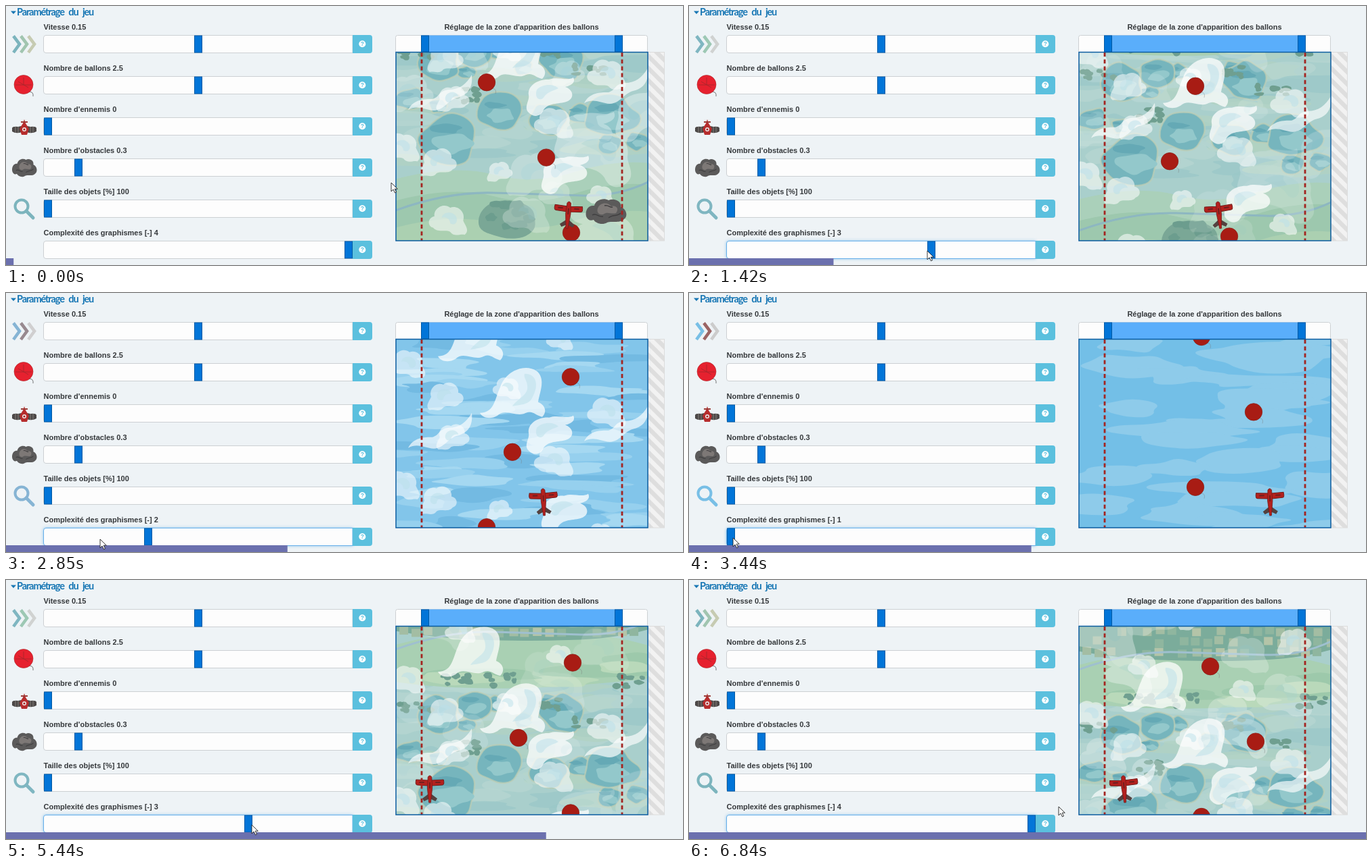
These frames come from a looping animation (1000 by 384 pixels, 6920 ms). An HTML page:

```html
<!DOCTYPE html>
<html lang="fr">
<head>
<meta charset="utf-8">
<title>Paramétrage du jeu</title>
<style>
  html, body { margin: 0; width: 100%; height: 100%; overflow: hidden; background: #eef3f6; }
  svg { display: block; }
  .label { font: bold 11px "Liberation Sans", Arial, sans-serif; fill: #35383b; }
  .title { font: bold 14.5px Lato, "Noto Sans", sans-serif; letter-spacing: -1.1px; word-spacing: 4px; fill: #1676b4; }
  .help { font: bold 8.5px "Liberation Sans", Arial, sans-serif; fill: #5bc0de; text-anchor: middle; }
  .box { fill: #fdfdfd; stroke: #ccd0d3; }
  .focus { stroke: #66afe9; filter: drop-shadow(0 0 2px #66afe9aa); }
  .knob { fill: #0275d8; stroke: #025aa5; }
</style>
</head>
<body>
<svg id="stage" width="1000" height="384" viewBox="0 0 1000 384">
  <defs>
    <clipPath id="view"><rect x="576" y="69" width="372" height="279"/></clipPath>
    <pattern id="stripes" width="18" height="18" patternUnits="userSpaceOnUse" patternTransform="translate(948 69)">
      <rect width="18" height="18" fill="#f2f2f2"/>
      <path d="M0 0L18 18H9L0 9ZM9 0H18V9Z" fill="#dedede"/>
    </pattern>
    <g id="ghost">
      <path fill="#fff" fill-opacity=".74" d="M-52 30C-30 30-30 8-22-8C-14-32 14-44 32-32C46-20 36 0 34 14C44 18 48 28 40 36C30 34 26 26 16 30C2 38-14 22-26 34C-36 40-48 38-52 30Z"/>
      <path fill="#b9dfe9" fill-opacity=".5" d="M14-28C34-28 34-8 26 6C22 18 8 18-4 20C4 8 20 4 18-10C18-18 12-22 14-28Z"/>
    </g>
    <g id="wing">
      <path fill="#fff" fill-opacity=".74" d="M38-26C42-18 34-14 26-12C38-8 40 4 30 9C20 14 2 10-6 22C-10 32-20 34-28 26C-36 18-26 8-28 0C-30-14-14-24 2-23C16-28 28-20 38-26Z"/>
      <path fill="#b9dfe9" fill-opacity=".5" d="M-16-8C-6-18 10-16 16-10C8-6-2-4-6 4C-12 10-20 4-16-8Z"/>
    </g>
    <path id="swirl" fill="#fff" fill-opacity=".66" d="M36-34C38-14 30-4 14 0C0 4-4 18-20 19C-34 18-44 10-58 18C-50 2-34 2-22 2C-10-2-14-10 2-12C18-12 28-20 36-34Z"/>
    <g id="puff">
      <path fill="#fff" fill-opacity=".55" d="M-24 20C-32 14-24 6-22 0C-26-12-14-22-4-18C6-26 20-16 18-6C28-4 28 8 20 10C14 18 2 12-4 16C-10 24-18 18-24 20Z"/>
      <path fill="#b9dfe9" fill-opacity=".5" d="M-12-6C-6-14 6-12 8-4C2-6-4-2-4 4C-10 8-16 2-12-6Z"/>
    </g>
    <g id="rock">
      <path fill="#5b5a5a" d="M-29 8C-31-1-26-9-17-8C-15-17-3-20 4-16C13-20 24-14 22-6C31-3 33 8 27 12C20 19 8 14 2 17C-6 22-16 17-18 13C-23 15-27 13-29 8Z"/>
      <path fill="#7d7876" d="M-12-4C-8-14 4-13 8-7C16-9 20-3 15 3C8 5 2 0-4 5C-10 6-14 2-12-4Z"/>
      <path fill="none" stroke="#403f40" stroke-width="1.5" d="M-20 6C-14 2-10 10-4 8M4 10C10 5 18 8 22 3M-2-8C4-10 6-4 10-6"/>
    </g>
    <g id="ball">
      <path d="M9 9Q15 10 13 17" fill="none" stroke="#777" stroke-width=".8" opacity=".5"/>
      <circle r="12.700" fill="#a81c14" stroke="#8d2019" stroke-width=".8"/>
    </g>
  </defs>
  <rect width="1000" height="384" fill="#eef3f6"/>
  <path d="M7 7.500H15L11 12Z" fill="#1676b4"/>
  <text class="title" x="16" y="14">Paramétrage du jeu</text>
  <g id="rows"></g>

  <g fill="none" stroke-width="4.600" id="chevrons"></g>
  <path d="M34 127Q41 127 40 134" fill="none" stroke="#777"/>
  <circle cx="26" cy="116.500" r="14" fill="#e6212f" stroke="#a92a2c" stroke-width=".6"/>
  <path d="M14 117H38M26 106V117M18 112L33 121" stroke="#8f2a2c" stroke-width=".9" opacity=".7"/>
  <g>
    <path d="M9 181Q10 178 18 179L27 177L36 179Q44 178 45 181V186Q38 190 31 187H23Q15 190 9 186Z" fill="#4c4847"/>
    <path d="M14 179V188M18 179V188M36 179V188M40 179V188" stroke="#85807d"/>
    <path d="M27 168L29 174L34 182L31 191H23L20 182L25 174Z" fill="#b62d2d"/>
    <path d="M22 172H32" stroke="#9d3b37" stroke-width="2"/>
    <circle cx="27" cy="183" r="3" fill="#eee"/><circle cx="27" cy="183" r="1.600" fill="#a22"/>
  </g>
  <use href="#rock" transform="translate(27 239.500) scale(.61 .72)"/>
  <g id="lens" fill="none">
    <circle cx="23" cy="297" r="9.500" stroke-width="4"/>
    <path d="M30 304L40 314" stroke-width="5" stroke-linecap="round"/>
  </g>

  <text class="label" x="761.500" y="35" text-anchor="middle">Réglage de la zone d'apparition des ballons</text>
  <rect class="box" x="575.500" y="43.500" width="372" height="26" rx="3"/>
  <rect x="613" y="43.500" width="298" height="25" fill="#5aaefb"/>
  <rect class="knob" x="613.500" y="44" width="11" height="24"/>
  <rect class="knob" x="899.500" y="44" width="11" height="24"/>
  <rect x="948" y="68.500" width="24.500" height="279.500" fill="url(#stripes)" stroke="#dcdcdc"/>

  <g clip-path="url(#view)">
    <g id="calm"></g>
    <g id="sea"></g>
    <g id="land"></g>
    <g id="clouds"></g>
    <g id="haze"></g>
    <g id="things"></g>
    <g id="plane">
      <path d="M-2 17L-12 24L-9 28L0 24L9 28L12 24L2 17Z" fill="#54413f"/>
      <path d="M-22-4Q-24 4-20 4L-3 5H3L20 4Q24 4 22-4L3-3H-3Z" fill="#b3201d" stroke="#711d1b"/>
      <path d="M-3-8Q0-12 3-8L4 8L1.500 30H-1.500L-4 8Z" fill="#b3201d" stroke="#711d1b" stroke-width=".8"/>
      <path d="M-17 0H-9M9 0H17M0 0V9" stroke="#6d1f1e" stroke-width="2"/>
    </g>
    <path d="M614 69V348M910 69V348" stroke="#a32420" stroke-width="2.800" stroke-dasharray="6 4.200"/>
  </g>
  <rect x="576" y="68.500" width="372" height="279.500" fill="none" stroke="#0b5ca0" stroke-width="1.500"/>

  <rect id="bar" y="374" height="10" fill="#6b70ae"/>
  <path id="cursor" d="M0 0V13L3 10L5.500 15L7.500 14L5.200 9.200H9.300Z" fill="#fff" stroke="#222" stroke-width=".9"/>
</svg>
<script>
const $ = id => document.getElementById(id);
const LOOP = 6920, STEP = 77.7, STEPS = 89;
const LEFT = 576, RIGHT = 948, TOP = -160, BOTTOM = 360;

let seed = 7;
const rand = (a = 0, b = 1) => {
  seed = (seed * 16807) % 2147483647;
  return a + (b - a) * seed / 2147483647;
};
const pick = list => list[Math.floor(rand() * list.length)];
const times = (n, fn) => Array.from({ length: n }, (_, i) => fn(i)).join('');

// Closed wobbly outline, smoothed through the midpoints of its corners
function blob(x, y, rx, ry, fill, wob = .25, extra = '') {
  const n = 12;
  const p = Array.from({ length: n }, (_, i) => {
    const a = i / n * 2 * Math.PI, r = 1 + rand(-wob, wob);
    return [x + rx * r * Math.cos(a), y + ry * r * Math.sin(a)];
  });
  const mid = i => {
    const a = p[i % n], b = p[(i + 1) % n];
    return ((a[0] + b[0]) / 2).toFixed(1) + ' ' + ((a[1] + b[1]) / 2).toFixed(1);
  };
  const curves = p.map((q, i) => `Q${q[0].toFixed(1)} ${q[1].toFixed(1)} ${mid(i)}`).join('');
  return `<path d="M${mid(n - 1)}${curves}Z" fill="${fill}" ${extra}/>`;
}
const rect = (x, y, w, h, fill) => `<rect x="${x}" y="${y}" width="${w}" height="${h}" fill="${fill}"/>`;
const use = (id, x, y, s = 1, flip = 1) =>
  `<use href="#${id}" transform="translate(${x} ${y}) scale(${s * flip} ${s})"/>`;
const ground = color => rect(LEFT, TOP, RIGHT - LEFT, BOTTOM - TOP, color);

// Settings rows; the last one is moved by the pointer
const settings = [['Vitesse 0.15', 278], ['Nombre de ballons 2.5', 278], ["Nombre d'ennemis 0", 56],
  ["Nombre d'obstacles 0.3", 101], ['Taille des objets [%] 100', 56], ['', 500]];
$('rows').innerHTML = settings.map(([name, x], i) => `
  <g transform="translate(0 ${i * 61})">
    <text class="label" x="55.5" y="35">${name}</text>
    <path class="box" d="M512 43.5H59Q55.5 43.5 55.5 47V66Q55.5 69.5 59 69.5H512Z"/>
    <rect class="knob" x="${x + .5}" y="44" width="11" height="25"/>
    <path d="M512 43H537Q541 43 541 47V66Q541 70 537 70H512Z" fill="#5bc0de"/>
    <circle cx="526.3" cy="56.3" r="5" fill="#fff"/>
    <text class="help" x="526.3" y="59.4">?</text>
  </g>`).join('');
const [levelText, levelBox, levelKnob] = $('rows').lastElementChild.children;

$('chevrons').innerHTML = times(3, i => `<path d="M${11 + i * 11} 44.5l9 12l-9 12.5"/>`);
const chevrons = [...$('chevrons').children];

// Water: broad patches for the calm sea, finer ribbons for the livelier one
const water = (base, tones, count, rx, ry) => ground(base) + times(count, i =>
  blob(rand(LEFT, RIGHT), TOP + (BOTTOM - TOP) * i / count, rand(rx / 2, rx), rand(ry / 2, ry), pick(tones), .42));
$('calm').innerHTML = water('#73bfe7', ['#8ecbea'], 48, 100, 18);
$('sea').innerHTML = water('#82c5ea', ['#96d0ee', '#73bae2', '#a5d8f1'], 100, 75, 10);

function lake(x, y, r) {
  const ry = r * .8;
  return blob(x, y, r, ry, '#76b5bd', .22, 'stroke="#bfcfb5" stroke-width="2.5" stroke-opacity=".7"') +
    blob(x + 4, y + ry * .25, r * .6, ry * .4, '#93c8cb', .3) +
    blob(x - 5, y - ry * .35, r * .5, ry * .2, '#65a9b5', .3);
}
const field = (y, color) => `<path d="M570 ${y}q90 -24 150 -8t120 -4t120 -12V400H570Z" fill="${color}"/>`;
const grove = (x, y) => times(8, () =>
  blob(x + rand(-26, 26), y + rand(-10, 10), rand(4, 8), rand(3, 5), '#6f9f90', .2));

// From top to bottom: town, meadow, lakes, fields
function landscape() {
  const haze = times(44, () =>
    blob(rand(LEFT, RIGHT), rand(40, 260), rand(30, 75), rand(6, 15), pick(['#b8d8d2', '#9bc8c8', '#b2d3c2']), .35, 'opacity=".7"'));
  const meadow = blob(762, 3, 260, 44, '#a9d0b3', .12) +
    times(6, () => blob(rand(LEFT, RIGHT), rand(0, 35), rand(40, 100), 10, pick(['#b9d9ba', '#9dc9ab'])));
  let town = blob(762, -88, 270, 66, '#7bac9b', .1);
  for (let x = 578; x < RIGHT; x += 18)
    for (let y = -96; y < -40; y += 16)
      if (rand() > .4) town += rect(x + rand(0, 4), y + rand(0, 5), 13, 12, pick(['#b4c4a8', '#8fb69f', '#a3bda3']));
  const road = (y, color) => `<path d="M570 ${y}q80 -30 150 -28t130 4t110 -26" fill="none" stroke="${color}" stroke-width="3"/>`;
  const lakes = [[637, 84, 34], [690, 68, 28], [822, 82, 36], [655, 194, 46], [728, 156, 32], [800, 168, 28], [893, 162, 40]];
  const small = times(9, i => lake(LEFT + 20 + i * 42, rand(60, 210), rand(12, 22)));

  return ground('#a9cfcc') + haze + meadow + town + road(-12, '#9fc0cf') +
    small + lakes.map(l => lake(...l)).join('') +
    field(258, '#aad0ba') + field(290, '#9dc8ae') + field(330, '#abd0b1') + road(305, '#8db7c1') +
    blob(742, 316, 44, 30, '#7aa796', .12) + times(12, () => blob(742 + rand(-35, 35), 312 + rand(-20, 20), 9, 6, '#6c9d8e')) +
    grove(690, 132) + times(6, i => grove(LEFT + 30 + i * 64, rand(30, 95)));
}
$('land').innerHTML = landscape();

const clouds = [['ghost', 690, -12], ['ghost', 752, 72], ['wing', 800, 132], ['swirl', 652, 136],
  ['swirl', 912, 126], ['puff', 640, 232], ['wing', 822, 248], ['puff', 650, 78]];
$('clouds').innerHTML = clouds.map(c => use(...c)).join('') +
  times(14, i => use('puff', LEFT + (i * 147 + 25) % 372, -150 + i * 36, rand(.7, 1.1), pick([1, -1])));
$('haze').innerHTML = times(20, i =>
  use(pick(['puff', 'puff', 'wing']), rand(580, 945), -230 + i * 30, rand(.9, 1.6), pick([1, -1])));

$('things').innerHTML = [835, 798, 710, 748, 834, 757, 837, 770]
  .map((x, i) => use('ball', x, 336 - i * 111.4)).join('') + use('rock', 886, 304);

// Key points: step, then values
const drift = [[0, 0], [28, 65], [58, 105], [70, 118], [88, 170]];
const pointer = [[0, 569, 262], [8, 505, 363], [18, 352, 363], [28, 213, 367], [44, 65, 363],
  [58, 213, 361], [70, 363, 363], [82, 505, 362], [88, 546, 336]];
const flight = [[0, 831, 5], [18, 782, -6], [28, 729, -4], [44, 858, -2], [58, 843, 4], [70, 626, 0], [88, 642, -4]];

const clamp = (v, lo, hi) => Math.max(lo, Math.min(hi, v));
const smooth = u => u * u * (3 - 2 * u);
const rested = u => smooth(clamp((u - .2) / .6, 0, 1));
function along(path, k, ease = u => u) {
  const i = Math.max(1, path.findIndex(p => p[0] >= k));
  const a = path[i - 1], b = path[i], u = ease((k - a[0]) / (b[0] - a[0]));
  return a.slice(1).map((v, j) => v + (b[j + 1] - v) * u);
}

const tints = [['#78bfe6', '#9b6464', '#cccccc'], ['#86b4d4', '#98898f', '#d0cfd0'],
  ['#7fb6c1', '#9dc8b4', '#d0d2d1'], ['#7cb4bd', '#a1c5b0', '#c6cbb2']];
const set = (id, name, value) => $(id).setAttribute(name, value);
const shift = (id, x, y) => set(id, 'transform', `translate(${x} ${y})`);
const show = (id, on) => set(id, 'visibility', on ? 'visible' : 'hidden');

function draw(t) {
  const k = Math.min(STEPS - 1, Math.floor(t / STEP));
  const [mx, my] = along(pointer, k, rested);
  const level = clamp(Math.round((mx - 62) / 148) + 1, 1, 4);

  shift('cursor', mx, my);
  levelKnob.setAttribute('x', 56.5 + (level - 1) * 148);
  levelText.textContent = 'Complexité des graphismes [-] ' + level;
  levelBox.classList.toggle('focus', k > 7);
  chevrons.forEach((c, i) => c.setAttribute('stroke', tints[level - 1][i]));
  set('lens', 'stroke', tints[level - 1][0]);

  show('calm', level === 1);
  show('sea', level === 2);
  show('land', level > 2);
  show('clouds', level > 1);
  show('haze', level > 2);
  set('haze', 'opacity', level * .2 - .35);
  for (const id of ['calm', 'sea', 'land']) shift(id, 0, k * 1.67);
  const [dy] = along(drift, k);
  shift('clouds', 0, dy);
  shift('haze', 0, dy * 1.3);
  shift('things', 0, k * 6.5);

  const [px, tilt] = along(flight, k, smooth);
  set('plane', 'transform', `translate(${px} 300) rotate(${tilt}) scale(.92 1)`);
  set('bar', 'width', 1000 * (k + 1) / STEPS);
}

function loop() {
  draw(performance.now() % LOOP);
  requestAnimationFrame(loop);
}
loop();
</script>
</body>
</html>
```
